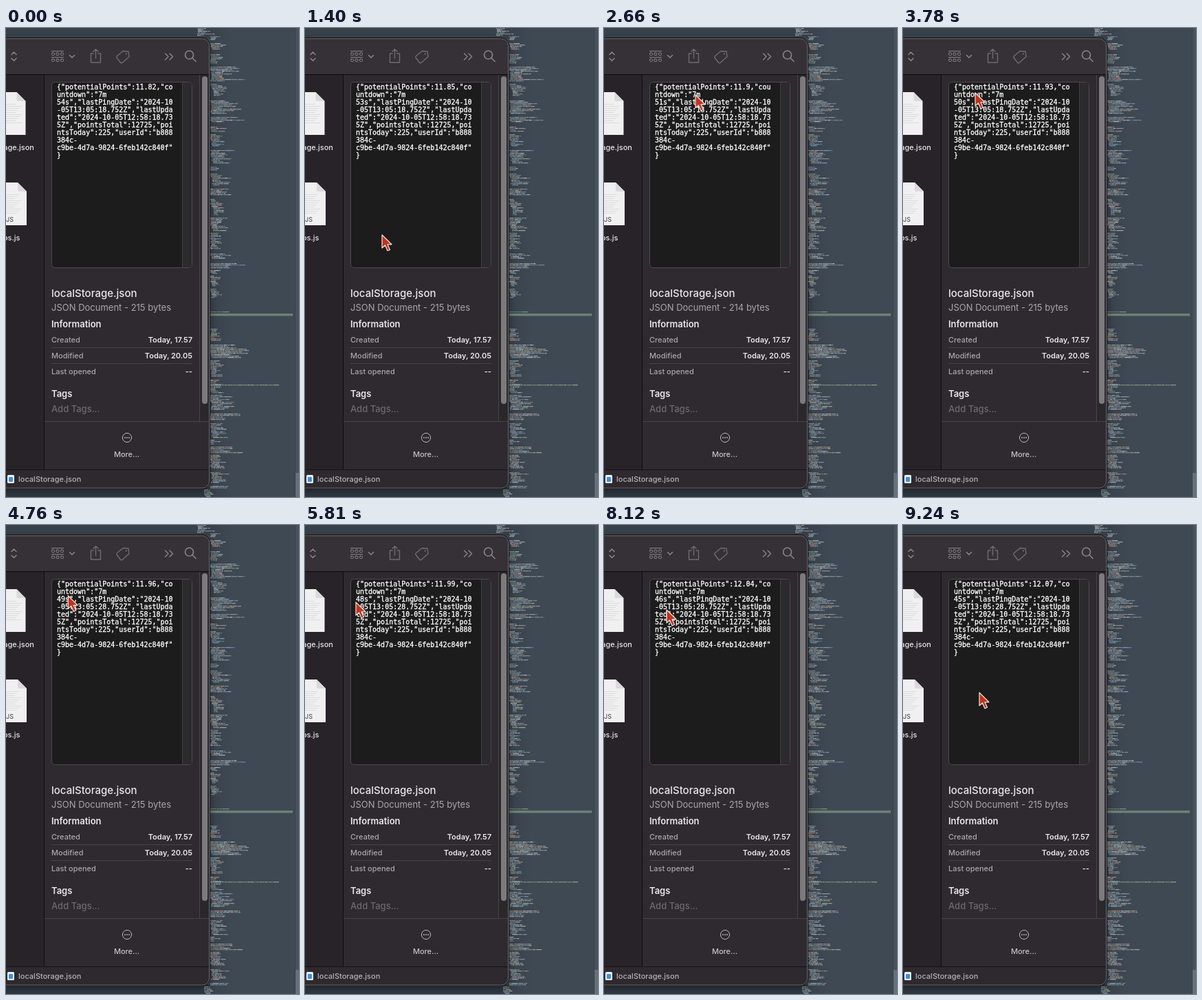
An HTML page with a canvas for the animation above (9.31 s loop, 426x680 px).

```html
<!DOCTYPE html>
<html lang="en">
<head>
<meta charset="utf-8">
<title>File preview</title>
<style>
  html, body { margin: 0; width: 100%; height: 100%; overflow: hidden; background: #3f4954; }
  canvas, svg { position: absolute; left: 0; top: 0; width: 426px; height: 680px; }
  text { font-family: Inter, "Liberation Sans", sans-serif; font-size: 11px; white-space: pre; }
  .code text { font-family: "DejaVu Sans Mono", monospace; font-size: 10px; fill: #fff; stroke: #fff; stroke-width: .3px; }
</style>
</head>
<body>
<canvas id="stage"></canvas>
<svg viewBox="0 0 426 680">
  <g id="labels"></g>
  <g id="code" class="code"></g>
  <path id="pointer" d="M0 0V19L4.5 15L8 23L11.5 21.5L8 13.8H14Z" fill="#c3331c" stroke="#eee4e2" stroke-width="1.2" stroke-linejoin="round"/>
</svg>
<script>
const W = 426, H = 680, LOOP = 9310, STEP = 70;
const canvas = document.getElementById('stage');
const labels = document.getElementById('labels');
const code = document.getElementById('code');
const pointer = document.getElementById('pointer');
const dpr = window.devicePixelRatio || 1;
canvas.width = W * dpr;
canvas.height = H * dpr;
const c = canvas.getContext('2d');
c.scale(dpr, dpr);

let seed = 71;
function rnd() {
  seed = (seed * 1664525 + 1013904223) >>> 0;
  return seed / 4294967296;
}

function rect(x, y, w, h, color) {
  c.fillStyle = color;
  c.fillRect(x, y, w, h);
}

function round(x, y, w, h, r, fill, stroke) {
  c.beginPath();
  c.roundRect(x, y, w, h, r);
  if (fill) { c.fillStyle = fill; c.fill(); }
  if (stroke) { c.strokeStyle = stroke; c.lineWidth = 1; c.stroke(); }
}

function line(d, color, width = 1.4) {
  c.strokeStyle = color;
  c.lineWidth = width;
  c.lineCap = c.lineJoin = 'round';
  c.stroke(new Path2D(d));
}

function addText(parent, x, y, str, style = {}) {
  const el = document.createElementNS('http://www.w3.org/2000/svg', 'text');
  el.setAttribute('x', x);
  el.setAttribute('y', y);
  Object.assign(el.style, style);
  el.textContent = str;
  parent.appendChild(el);
  return el;
}

const inks = ['#a9b8c2', '#86a3b6', '#b3babe', '#9dae9c', '#b0917f', '#7d919f'];

function codeLine(x, y, w, ink) {
  const end = x + w;
  while (x < end) {
    const n = Math.min(end - x, 2 + rnd() * 8);
    c.globalAlpha = .55 + rnd() * .4;
    rect(x, y, n, 1.3, ink || inks[Math.floor(rnd() * inks.length)]);
    x += n + .4 + rnd() * .6;
  }
  c.globalAlpha = 1;
}

function codeBlock(x, top, bottom, width) {
  let indent = 0;
  for (let y = top; y < bottom; y += 2) {
    codeLine(x + indent, y, Math.max(3, (width - indent) * (.3 + .7 * rnd())));
    indent = Math.max(0, Math.min(5, indent + Math.round(rnd() * 4 - 2)));
  }
}

// Whole file as seen from afar: random blocks with gaps, a few of them wide
function codeOverview() {
  codeBlock(278, 0, 11, 26);
  codeBlock(288, 669, H, 16);
  for (let y = 12; y < 666;) {
    const bottom = Math.min(668, y + 4 + rnd() * 20);
    if (bottom < 408 || y > 420) codeBlock(297, y, bottom, 14 + 46 * rnd() ** 3 + 8 * rnd());
    y = Math.ceil(bottom) + 2 + Math.floor(rnd() * 5);
  }
  codeLine(297, 411, 28, '#8aa08d');
  rect(297, 414, 120, 3.5, '#6a8174');
  codeLine(297, 517, 100, '#94a893');
}

function drawEditor() {
  rect(0, 0, W, H, '#3f4954');
  const side = c.createLinearGradient(296, 0, 330, 0);
  side.addColorStop(0, 'rgba(15,21,27,.14)');
  side.addColorStop(1, 'rgba(15,21,27,0)');
  rect(296, 0, 34, H, side);
  rect(0, 0, 296, 15, 'rgba(15,21,27,.14)');
  rect(0, 666, 296, 14, 'rgba(15,21,27,.3)');
  codeOverview();
  rect(420, 0, 6, H, '#47525c');
  rect(420, 0, 1, H, '#38434d');
  rect(421, 645, 5, 35, '#65707a');
}

function page(right, top) {
  const fold = 13;
  c.fillStyle = '#f0f0f0';
  c.fill(new Path2D(`M-20 ${top}H${right - fold}L${right} ${top + fold}V${top + 62}H-20Z`));
  for (let y = top + 17; y < top + 46; y += 3) rect(0, y, 12 + (y * 7) % 12, .7, '#d4d4d4');
  c.fillStyle = '#dadada';
  c.fill(new Path2D(`M${right - fold} ${top}V${top + fold - 2}Q${right - fold} ${top + fold} ${right - fold + 2} ${top + fold}H${right}Z`));
}

function drawToolbar() {
  const g = '#868287', dim = '#6f6b70';
  line('M8 38.5L11.5 35L15 38.5M8 44L11.5 47.5L15 44', g, 1.6);
  for (const y of [33, 42]) {
    rect(66, y, 18, 1, g);
    for (const x of [66.5, 73, 79.5]) round(x, y + 3, 4, 3.5, 1, null, g);
  }
  line('M92.5 39.5L96 43L99.5 39.5', g, 1.6);
  line('M127 37H123.5V50H137.5V37H134M130.5 44V31M127 34L130.5 30.8L134 34', dim);
  line('M161 41L170 33.5L178 34L179 41.5L169 50.5Q167.5 51.5 166 49.5L161 43Q160.5 42 161 41Z', dim);
  line('M174.6 37.6h.4', dim, 2);
  line('M231.5 37L236 41.5L231.5 46M238 37L242.5 41.5L238 46', g, 1.5);
  line('M272.5 39A6 6 0 1 1 260.5 39A6 6 0 1 1 272.5 39M271 43.5L276 48.5', g, 1.7);
}

function drawWindow() {
  c.save();
  c.shadowColor = 'rgba(0,0,0,.4)';
  c.shadowBlur = 12;
  c.shadowOffsetY = 4;
  round(-30, 14, 326.5, 654, 11, '#111');
  c.restore();
  c.save();
  c.beginPath();
  c.roundRect(-30, 15, 325.5, 652, 10);
  c.clip();
  rect(0, 14, 297, 654, '#2e2a2f');
  rect(0, 14, 297, 53, '#363137');
  rect(0, 67, 297, 1, '#0d0b0e');
  rect(0, 68, 55, 572, '#272329');
  rect(55, 68, 1, 572, '#0f0d10');
  rect(281, 68, 15, 502, '#2b282c');
  rect(281, 68, 1, 502, '#484549');
  rect(56, 570, 240, 1, '#474348');
  rect(0, 640, 297, 1, '#161418');
  rect(0, 641, 297, 28, '#2d292e');
  c.restore();
  round(-30, 15.5, 325.5, 651.5, 10, null, '#6a676b');
  round(285, 70, 8, 475, 4, '#7d7a7e');

  round(66.5, 78.5, 204, 269, 5, '#1c1c1c', '#4c4a4d');
  round(256, 79, 14, 268, [0, 4, 4, 0], '#2b2a2c');
  rect(256, 79, 1, 268, '#434144');

  for (const y of [463, 486]) rect(66, y, 205, 1, '#474448');
  page(28.5, 93);
  page(30, 224);
  drawToolbar();

  c.beginPath();
  c.arc(176, 594, 6.6, 0, 7);
  c.strokeStyle = '#bcb9bd';
  c.lineWidth = 1;
  c.stroke();
  for (const x of [173, 176, 179]) {
    c.beginPath();
    c.arc(x, 594, .9, 0, 7);
    c.fillStyle = '#bcb9bd';
    c.fill();
  }
  round(2, 648, 10, 12, 1.5, '#eef3f8');
  round(4, 651, 6, 7, 1, '#3d8fe8');
}

const bright = '#e9e7ea', soft = '#aaa6ab';
const put = (x, y, str, size, weight, fill, anchor = 'start') =>
  addText(labels, x, y, str, { fontSize: size + 'px', fontWeight: weight, fill, textAnchor: anchor });

put(41, 177, 'localStorage.json', 11, 500, bright, 'end');
put(20.5, 308, 'os.js', 11, 500, bright, 'end');
put(11, 281, 'JS', 9, 500, '#555', 'end');
put(66, 390, 'localStorage.json', 15, 500, bright);
const kind = put(66, 410, '', 13, 400, soft);
put(66, 434, 'Information', 13, 600, bright);
[['Created', 'Today, 17.57'], ['Modified', 'Today, 20.05'], ['Last opened', '--']].forEach(([name, value], i) => {
  put(66, 456 + i * 23, name, 11, 500, soft);
  put(271, 456 + i * 23, value, 11, 600, bright, 'end');
});
put(66, 535, 'Tags', 13, 600, bright);
put(66, 557, 'Add Tags...', 13, 500, '#6d696e');
put(175.5, 622, 'More...', 11, 500, '#c4c1c5', 'middle');
put(18, 658, 'localStorage.json', 11, 500, '#b5b1b6');

const rows = Array.from({ length: 10 }, (_, i) => addText(code, 74, 89 + i * 11, ''));
let shown = -1;

function showTick(n) {
  if (n === shown) return;
  shown = n;
  const points = Number((11.819 + n * .0277).toFixed(2));
  const head = `{"potentialPoints":${points},"countdown":"7m`;
  const ping = n < 5 ? 18 : 28;
  const body = `${54 - n}s","lastPingDate":"2024-10-05T13:05:${ping}.752Z",` +
    '"lastUpdated":"2024-10-05T12:58:18.735Z","pointsTotal":12725,"pointsToday":225,"userId":"b888384c-';
  const lines = [head.slice(0, 28), head.slice(28), ...body.match(/.{1,28}/g), 'c9be-4d7a-9824-6feb142c840f"', '}'];
  rows.forEach((row, i) => { row.textContent = lines[i]; });
  const size = lines.join('').length + 1;
  kind.textContent = `JSON Document - ${size} bytes`;
}

// Pointer stops: [time, x, y]
const path = [
  [1400, 112, 300], [1750, 109, 246], [2660, 133, 97], [3780, 105, 94],
  [5810, 74, 112], [8120, 91, 123], [8680, 94, 126], [9240, 111, 243]
];

function movePointer(t) {
  const visible = t >= path[0][0];
  pointer.style.display = visible ? '' : 'none';
  if (!visible) return;
  const i = Math.max(1, path.findIndex(stop => stop[0] >= t));
  const [t0, x0, y0] = path[i - 1], [t1, x1, y1] = path[i];
  const p = (t - t0) / (t1 - t0);
  const e = p * p * (3 - 2 * p);
  pointer.setAttribute('transform', `translate(${x0 + (x1 - x0) * e} ${y0 + (y1 - y0) * e})`);
}

function frame() {
  const t = Math.floor(performance.now() % LOOP / STEP) * STEP;
  showTick(Math.min(9, Math.floor((t + 630) / 1050)));
  movePointer(t);
  requestAnimationFrame(frame);
}

// The saved file is one byte longer than the text on show
drawEditor();
drawWindow();
frame();
</script>
</body>
</html>
```
